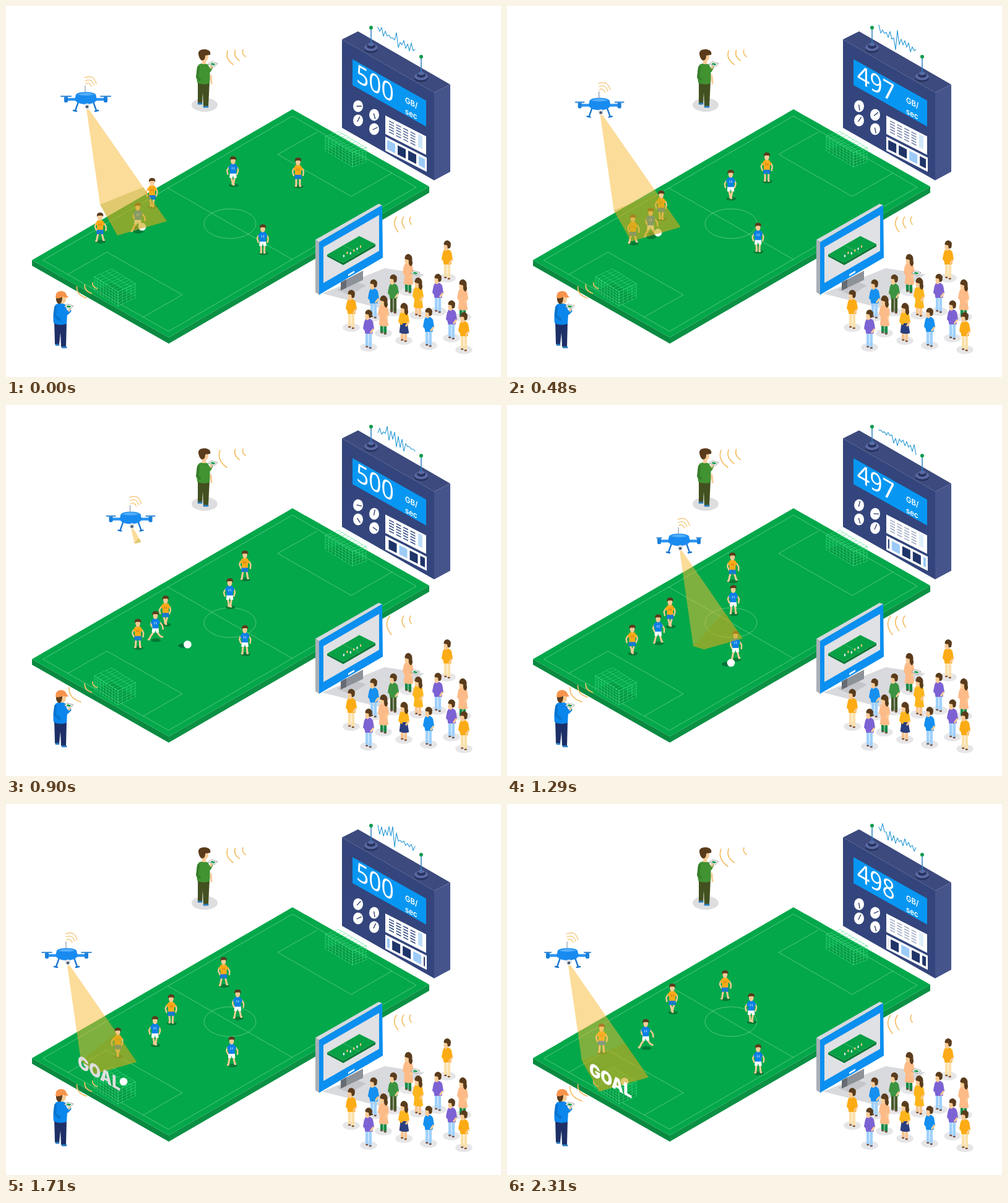
An HTML page for the animation above (2.34 s loop, 800 by 600 pixels).

```html
<!DOCTYPE html>
<html lang="en">
<head>
<meta charset="utf-8">
<title>Live match data</title>
<style>
html, body { margin: 0; width: 100%; height: 100%; overflow: hidden; background: #fff; }
svg { display: block; }
.read { font: 500 41px "Noto Sans", sans-serif; fill: #fff; }
.unit { font: 600 13px Inter, sans-serif; fill: #fff; }
.goal { font: 900 28px Inter, sans-serif; }
</style>
</head>
<body>
<svg id="stage" width="800" height="600" viewBox="0 0 800 600"></svg>
<script>
const LOOP = 2340, STEP = 30;
const SKIN = '#f9cb96', HAIR = '#5a3c1c', BLUE = '#0a86ec', NAVY = '#1f3468', WAVE = '#f4c06a';

const poly = (pts, fill, more = '') => `<polygon points="${pts}" fill="${fill}" ${more}/>`;
const path = (d, fill, more = '') => `<path d="${d}" fill="${fill}" ${more}/>`;
const line = (d, color, w, more = '') =>
  `<path d="${d}" fill="none" stroke="${color}" stroke-width="${w}" stroke-linecap="round" stroke-linejoin="round" ${more}/>`;
const oval = (x, y, rx, ry, fill, more = '') =>
  `<ellipse cx="${x}" cy="${y}" rx="${rx}" ry="${ry}" fill="${fill}" ${more}/>`;
const rect = (x, y, w, h, fill, more = '') =>
  `<rect x="${x}" y="${y}" width="${w}" height="${h}" fill="${fill}" ${more}/>`;
const group = (inner, more = '') => `<g ${more}>${inner}</g>`;
const times = (n, f) => Array.from({ length: n }, (_, i) => f(i)).join('');

const rand = n => { const v = Math.sin(n * 127.1 + 4) * 43758.5; return v - Math.floor(v); };
const ramp = (t, a, b) => Math.max(0, Math.min(1, (t - a) / (b - a)));
const mix = (a, b, k) => a.map((v, i) => v + (b[i] - v) * k);

// smooth curve through evenly timed points
function curve(pts, t) {
  const s = t / LOOP * (pts.length - 1), sum = [0, 0];
  pts.forEach((p, i) => {
    const w = pts.reduce((m, _, j) => j === i ? m : m * (s - j) / (i - j), 1);
    sum[0] += p[0] * w;
    sum[1] += p[1] * w;
  });
  return sum;
}

// mesh over a parallelogram
function mesh([x, y], [ux, uy], [vx, vy], n, m) {
  let d = '';
  for (let i = 0; i <= n; i++) d += `M${x + ux * i / n} ${y + uy * i / n}l${vx} ${vy}`;
  for (let j = 0; j <= m; j++) d += `M${x + vx * j / m} ${y + vy * j / m}l${ux} ${uy}`;
  return d;
}

function pitch() {
  const mark = d => line(d, '#7fd49a', 1, 'opacity=".65"');
  return poly('42,411 263,536 263,546 42,420', '#0a8a40') +
    poly('263,536 684,292 684,302 263,546', '#0b9144') +
    poly('42,411 463,167 684,292 263,536', '#03a84a') +
    mark('M60 411L463 178L663 293L263 526ZM261 294L463 410') +
    mark('M100 434L163 398L285 467L222 503M503 204L439 240L558 308L624 270') +
    oval(362, 352, 42, 24, 'none', 'stroke="#7fd49a" opacity=".65"');
}

function goal(x, y, back, side) {
  const down = [0, 23], [bx, by] = back, [sx, sy] = side;
  const d = mesh([x, y], back, side, 8, 3) + mesh([x, y], back, down, 8, 5) +
    mesh([x + bx, y + by], side, down, 4, 5);
  return poly(mixFloor(x, y + 23, back, side), '#057a38', 'opacity=".35"') + line(d, '#43e083', 0.7, 'opacity=".8"');
}
const mixFloor = (x, y, [ax, ay], [bx, by]) =>
  `${x},${y} ${x + ax},${y + ay} ${x + ax + bx},${y + ay + by} ${x + bx},${y + by}`;

function antenna(x, y) {
  return oval(x, y + 35, 11, 6, '#26335f') + oval(x, y + 32, 11, 6, '#5a69a3') +
    oval(x, y + 30, 7, 4, '#26335f') + oval(x, y + 27, 5, 3, '#5a69a3') +
    line(`M${x} ${y}v26`, '#2b7fc0', 1.5) + oval(x, y, 3, 3, '#0c9c4c');
}

const dial = i => [569 + 26 * (i & 1), 162 + 14 * (i & 1) + 23 * (i >> 1)];

function server() {
  const slant = (x, y, s) => `transform="matrix(1 ${s} 0 1 ${x} ${y})"`;
  const dashes = times(20, i => rect(6 + i % 4 * 11.5, 5 + (i >> 2) * 4.4, 8, 1.8, '#2a437f'));
  return poly('543,54 569,41 718,127 692,140', '#3d4a7d') +
    poly('692,140 718,127 718,268 692,282', '#46548c') +
    poly('543,54 692,140 692,282 543,197', '#33457c') +
    group(rect(0, 0, 119, 42, '#0797f3'), slant(560, 86, 0.563)) +
    '<text id="count" class="read" transform="matrix(.866 .5 0 1 566 122)"></text>' +
    '<text class="unit" transform="matrix(.87 .44 0 1 645 156)">GB/</text>' +
    '<text class="unit" transform="matrix(.87 .44 0 1 645 174)">sec</text>' +
    times(4, i => oval(...dial(i), 8, 9.5, '#fff')) +
    line('', '#26335f', 1.3, 'id="needles"') +
    group(rect(0, 0, 66, 30, '#fff') +
      group(dashes + rect(53, 3, 7, 21, '#b9dcf8'), 'id="rows"'), slant(613, 177, 0.51)) +
    group(rect(0, 0, 67, 23, '#fff') +
      group(group('', 'id="tiles"'), 'clip-path="url(#slot)"'), slant(613, 211, 0.51)) +
    antenna(590, 35) + antenna(671, 82) + line('', '#2497d4', 1.1, 'id="signal"');
}

function monitor() {
  return poly('511,465 612,424 676,434 602,488', '#d9dadd') +
    poly('535,459 560,444 582,452 556,468', '#c3c5ca') +
    poly('541,447 577,428 577,443 541,460', '#8d9198') + poly('541,447 550,442 550,456 541,460', '#666b73') +
    poly('500,378 602,320 608,322 506,382', '#d5d9de') +
    poly('500,378 506,382 506,467 500,463', '#aab0b8') +
    poly('506,382 608,322 609,407 506,467', '#0b8ff0') +
    poly('513,390 603,338 603,396 513,448', '#dfe1e4') +
    poly('519,402 545,415 597,385 597,389 545,419 519,405', '#077a35') +
    poly('519,402 571,372 597,385 545,415', '#06a045') +
    line('M545 387L571 400', '#62c985', 0.6) +
    times(6, i => oval(546 + i * 5.4, 402 - i * 3 + rand(i) * 5, 1.2, 2.2, i % 2 ? '#f6c27c' : '#e8efff')) +
    poly('553,434 563,428 563,431 553,437', '#fff');
}

// shirt, legs, skirt
const outfits = {
  o: ['#fcab15', '#fbe0a8'], p: ['#7d62d3', '#9fd0fb'], b: ['#1590f0', '#9fd0fb'], g: ['#3c9442', '#455a2c'],
  d: ['#fdbb88', '#158a46', '#fdbb88'], y: ['#fcb51c', '#f7c593', '#fcb51c'], n: ['#fcb51c', '#f7c593', '#2b3f80']
};

// spectator seen from behind, (x, y) at the feet
function fan([x, y, kind]) {
  const [top, legs, skirt] = outfits[kind];
  return group(
    oval(0, -3, 15, 7, '#e6e6e8') +
    line('M-3 -28V-5M3 -28V-3', legs, 5) + line('M-4 -4h2M2 -2h2', '#7c5340', 2.5) +
    path('M-6 -48Q0 -52 6 -47Q9 -40 7 -25H-6Q-9 -38 -6 -48Z', top) +
    (skirt ? path('M-6 -31H6L9 -15Q0 -12 -8 -16Z', skirt) : '') +
    line('M-6 -44L-8 -34L-4 -30M6 -44L8 -33', top, 3.5) + line('M8 -32L4 -27', SKIN, 3) +
    oval(-2, -53, 4, 6, SKIN) +
    path(skirt ? 'M-6 -56Q-6 -64 1 -64Q8 -62 7 -53Q9 -47 5 -44Q0 -46 1 -54Z'
               : 'M-6 -57Q-6 -64 1 -64Q8 -62 6 -54Q5 -50 1 -51L0 -56Z', HAIR),
    `transform="translate(${x} ${y}) scale(.92 1)"`);
}

const fans = [[713, 443, 'o'], [650, 465, 'd'], [698, 497, 'p'], [626, 498, 'g'], [594, 506, 'b'], [666, 503, 'y'],
  [738, 506, 'd'], [558, 523, 'o'], [610, 532, 'd'], [720, 540, 'p'], [643, 544, 'n'], [683, 552, 'b'],
  [586, 555, 'p'], [740, 559, 'o']];

const tablet = (x, y) => group(poly('-7,0 -2,-4 8,-1 3,4', '#fff', 'stroke="#777" stroke-width=".7"') +
  poly('-4,0 -1,-2 5,0 2,2', '#12984a'), `transform="translate(${x} ${y})"`);

function viewer() {
  return oval(321, 160, 21, 11, '#dedee0') +
    path('M310 122H329L327 162H319L318 140L317 157H310Z', '#43501f') +
    line('M311 158h5M320 163h6', '#2a7fc0', 3) +
    path('M311 95Q319 90 327 95Q331 108 329 125Q319 129 309 124Q306 105 311 95Z', '#419231') +
    line('M311 99L309 115L313 119', '#367d29', 4) + line('M326 99L329 105L332 99', '#419231', 4.5) +
    line('M331 100L333 96M331 113L332 125', SKIN, 3) +
    rect(317, 86, 6, 8, SKIN) + oval(321, 82, 6, 7.5, SKIN) +
    path('M311 78Q310 70 321 70Q332 71 330 79L322 80Q322 89 316 88Q312 85 311 78Z', HAIR) + tablet(334, 94);
}

function pilot() {
  return path('M78 510H98L97 551H89L88 528L86 547H79Z', '#1d2f66') +
    line('M81 548h4M91 552h6', '#2a7fc0', 3) +
    path('M80 483Q88 478 96 483L99 498L98 514Q87 518 77 513Q75 495 80 483Z', BLUE) +
    line('M94 488L99 497L103 493', BLUE, 5) + line('M102 493L104 488', SKIN, 3) +
    line('M80 487L79 501L86 507', '#0873cc', 4) +
    oval(91, 474, 6, 7.5, SKIN) + path('M82 470H91Q91 481 86 482Q80 480 81 471Z', HAIR) +
    path('M80 472Q80 460 90 461Q97 462 98 468L101 471Q96 473 92 470Q86 474 80 472Z', '#f7944c') + tablet(101, 486);
}

// four shrinking arcs
function arcs(x, y, dx, dy, turn) {
  return times(4, i => line('M-4 -14Q-10 2 7 14', WAVE, 1.7,
    `class="arc${i}" transform="translate(${x + dx * i} ${y + dy * i}) rotate(${turn}) scale(${1 - i * 0.2})" vector-effect="non-scaling-stroke"`));
}

function drone() {
  const leg = s => line(`M${s * 12} 5L${s * 17} 19M${s * 20} 19l${-s * 5} 1`, '#1976d0', 2.4);
  const rotor = s => rect(s * 32 - 3, -4, 6, 10, '#1a7fdc', 'rx="2"');
  return leg(-1) + leg(1) + line('M-32 1H32', '#2b94f2', 4.5) + rotor(-1) + rotor(1) +
    line('', '#3f8fd6', 2.2, 'id="blades"') +
    path('M-16 -7Q-12 -11 0 -11Q12 -11 16 -7L18 2Q13 9 0 9Q-13 9 -18 2Z', '#188bf0') +
    path('M-14 -7Q0 -13 14 -7Q0 -3 -14 -7Z', '#53aef9') +
    oval(2, 12, 4.5, 4.5, '#dfe4ea') + oval(2, 13, 2.3, 2.3, '#4c5a70') +
    line('M-1 -11V-21', '#8a97a8', 1.2) +
    line('M0 -24Q5 -28 9 -20M-1 -29Q9 -34 13 -22M-2 -34Q13 -40 17 -24', WAVE, 1.2);
}

const squad = [
  { yellow: 1, run: 0.35, way: [[472, 269], [370, 261], [353, 294]] },
  { run: 0.3, way: [[367, 267], [364, 312], [396, 330]] },
  { yellow: 1, run: 0.35, way: [[236, 302], [262, 335], [267, 313]] },
  { yellow: 1, run: 0.4, way: [[152, 358], [213, 367], [189, 384], [152, 378]] },
  { run: 0.8, way: [[213, 342], [244, 361], [223, 372]] },
  { run: 0.3, way: [[415, 377], [392, 378], [364, 396], [410, 413]] }
];

function player({ yellow }) {
  const top = yellow ? '#fbab19' : '#0b80e6', shorts = yellow ? '#1778d6' : '#fff';
  return group(
    oval(1, 23, 8, 3, '#047a36') +
    line('', SKIN, 3, 'class="legs"') + line('', SKIN, 2.4, 'class="arms"') +
    path('M-5 2H5L5.8 11H1L0 7L-1 11H-5.8Z', shorts) +
    path('M-4.5 -11Q0 -13 4.5 -11L8 -5L5 -3V4H-5V-3L-8 -5Z', top) +
    line('M-1.5 -6v3M1.5 -6v3', yellow ? '#b5661c' : '#cfe6ff', 0.9) +
    oval(0, -16.5, 3.8, 5.5, SKIN) +
    path('M-5 -17Q-6 -24 0 -24Q6.5 -24 5 -17L3.5 -19H-3Z', HAIR), 'class="player"');
}

const stage = document.getElementById('stage');
stage.innerHTML =
  '<defs><clipPath id="slot"><rect x="3" y="3" width="61" height="17"/></clipPath></defs>' +
  pitch() + server() + goal(516, 211, [44, 26], [22, -8]) + goal(143, 438, [38, 24], [28, -13]) +
  monitor() + fans.map(fan).join('') + tablet(661, 432) + viewer() + pilot() +
  arcs(350, 87, 11.5, -3.5, 0) + arcs(620, 356, 11.3, -3, 16) + arcs(110, 469, 11, -5.5, -18) +
  oval(0, 0, 8, 3.5, '#04703a', 'id="shade"') + squad.map(player).join('') +
  '<circle id="ball" r="6.3" fill="#fff"/>' +
  poly('', '#fab935', 'id="cone" opacity=".5"') + poly('', '#969600', 'id="spot" opacity=".28"') +
  '<text id="cheer" class="goal">GOAL</text>' +
  group(drone(), 'id="drone"');

const $ = id => document.getElementById(id);
const set = (node, attrs) => { for (const k in attrs) node.setAttribute(k, attrs[k]); };
const players = [...stage.querySelectorAll('.player')].map(g =>
  ({ g, legs: g.querySelector('.legs'), arms: g.querySelector('.arms') }));
const rings = [0, 1, 2, 3].map(i => stage.querySelectorAll('.arc' + i));
const hidden = [0, 0, 1, 3, 0, 2];

function drawPlayers(t) {
  squad.forEach(({ run, way }, n) => {
    const [x, y] = curve(way, t), { g, legs, arms } = players[n];
    const w = 9 * run * Math.sin(t / 75 + n * 1.3);
    const foot = v => 22 - Math.max(0, v) * 0.6;
    set(g, { transform: `translate(${x} ${y})` });
    set(legs, { d: `M-3 10L${-3 + w * 0.6} 16L${-3 + w} ${foot(w)}h-1M3 10L${3 - w * 0.6} 16L${3 - w} ${foot(-w)}h1` });
    set(arms, { d: `M-7 -6L${-9 - w * 0.3} -1L${-7 - w * 0.6} 5M7 -6L${9 - w * 0.3} -1L${8 - w * 0.6} 5` });
  });
}

function drawDrone(t) {
  const out = mix([129, 150], [278, 219], ramp(t, 0, 1290) ** 2);
  const back = ramp(t, 1350, 1680);
  const [x, y] = mix(out, [98, 244], back * back * (3 - 2 * back));
  set($('drone'), { transform: `translate(${x} ${y})` });
  const r = 3 + 5 * Math.abs(Math.cos(t / 55));
  set($('blades'), { d: `M${-32 - r} -4h${2 * r}M${32 - r} -4h${2 * r}` });

  const size = 1 - 0.89 * ramp(t, 690, 840) + 0.67 * ramp(t, 900, 1260) + 0.22 * ramp(t, 1620, 1860);
  const corner = (dx, dy, k = size) => `${x + 3 + dx * k},${y + 18 + dy * k}`;
  const left = corner(20, 153, Math.min(1, size * 1.3));
  const front = corner(48, 203), right = corner(128, 180), rear = corner(90, 125);
  set($('cone'), { points: `${x + 1},${y + 17} ${left} ${front} ${right} ${x + 5},${y + 17}` });
  set($('spot'), { points: [left, front, right, rear].join(' ') });
}

function drawBall(t) {
  const run = mix([220, 357], [256, 371], ramp(t, 0, 720));
  const pass = mix(run, [362, 417], ramp(t, 720, 1230));
  const [cx, cy] = mix(pass, [190, 449], ramp(t, 1350, 1620));
  set($('ball'), { cx, cy });
  set($('shade'), { cx: cx - 7, cy: cy + 2, opacity: t > 1500 ? 0 : 1 });
  const settle = ramp(t, 1710, 1860), tone = 222 + 33 * settle;
  const [x, y] = mix([116, 425], [133, 437], settle);
  set($('cheer'), { transform: `matrix(.866 .5 0 1 ${x} ${y})`, opacity: ramp(t, 1590, 1690), fill: `rgb(${tone},${tone},${tone})` });
}

function drawServer(t) {
  const swing = Math.abs((t / 870 + 0.5) % 1 - 0.5) * 2;
  $('count').textContent = 500 - Math.round(3 * (t % 870 < 435 ? swing : swing));
  set($('needles'), { d: times(4, i => {
    const [x, y] = dial(i), a = Math.sin(t / 300 + i * 2) * 1.4, c = Math.cos(a), s = Math.sin(a);
    return `M${x - c * 2} ${y - s * 2}L${x + c * 5.5} ${y + s * 6.5}`;
  }) });
  set($('rows'), { opacity: 0.72 + 0.28 * Math.cos((t - 1800) / 162) });
  const start = 3 - (t * 0.035) % 51;
  $('tiles').innerHTML = times(8, i => rect(start + i * 17, 4, 13, 15, i % 3 ? NAVY : '#9ccbf7'));
  const n = 20, shift = Math.floor(t / 60) * 3;
  set($('signal'), { d: 'M' + times(n + 1, i => {
    const s = i + shift, high = rand(Math.floor(s / 5)) * 17 + 2;
    const spike = (s % 2 ? 1 : -1) * rand(s) * high;
    return `${601 + 60 * i / n} ${Math.max(29, 39 + 34 * i / n + spike)} `;
  }) });
}

function draw(t) {
  drawPlayers(t);
  drawDrone(t);
  drawBall(t);
  drawServer(t);
  const gap = hidden[Math.round(t / 440)];
  rings.forEach((list, i) => list.forEach(a => set(a, { opacity: i === gap ? 0 : 1 })));
}

const born = performance.now();
function tick() {
  const t = (performance.now() - born) % LOOP;
  draw(Math.floor(t / STEP) * STEP);
  requestAnimationFrame(tick);
}
tick();
</script>
</body>
</html>
```
